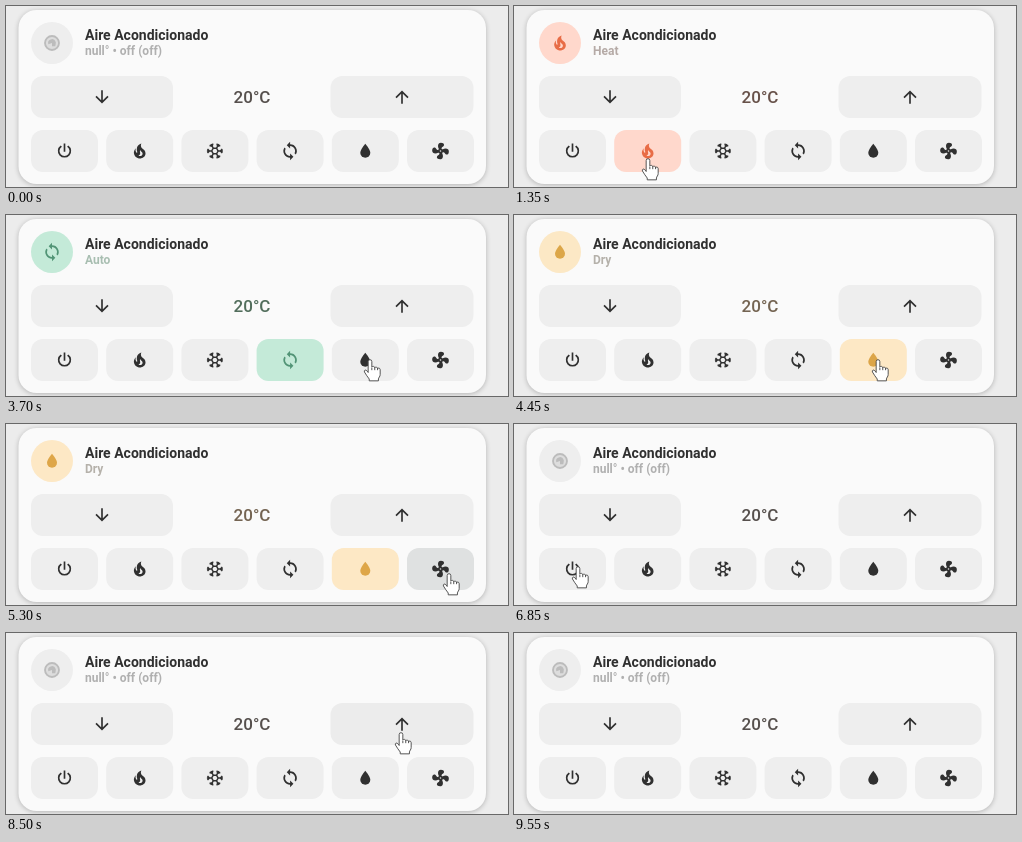
Recreate the animation shown at these times as an HTML page with a canvas. Size 502x181 px, loop 9.65 s.

```html
<!DOCTYPE html>
<html lang="es">
<head>
<meta charset="utf-8">
<title>Aire Acondicionado</title>
<style>
  html, body { margin: 0; width: 100%; height: 100%; overflow: hidden; background: #ececec; }
  canvas { display: block; width: 502px; height: 181px; filter: blur(.4px); }
</style>
</head>
<body>
<canvas id="stage"></canvas>
<script>
const LOOP = 9650, W = 502, H = 181, FADE = 280;
const canvas = document.getElementById('stage');
const ctx = canvas.getContext('2d');
const ratio = window.devicePixelRatio || 1;
canvas.width = W * ratio;
canvas.height = H * ratio;

const GREY = [238, 238, 238], PRESSED = [223, 225, 225], INK = [48, 48, 48];

const MODES = {
  off:  { label: 'null° • off (off)', bg: GREY, fg: [188, 188, 188], text: [86, 80, 77], sub: '#b0b0b0' },
  heat: { label: 'Heat', bg: [255, 216, 204], fg: [232, 108, 70], text: [104, 82, 74], sub: '#b5aaa6' },
  cool: { label: 'Cool', bg: [209, 218, 248], fg: [70, 98, 208], text: [66, 70, 100], sub: '#b2b2b6' },
  auto: { label: 'Auto', bg: [196, 234, 216], fg: [82, 148, 118], text: [82, 110, 92], sub: '#a8beb1' },
  dry:  { label: 'Dry', bg: [253, 232, 197], fg: [222, 166, 72], text: [116, 100, 82], sub: '#b5b1aa' },
  fan:  { label: 'Fan only', bg: [200, 235, 240], fg: [62, 160, 180], text: [72, 100, 108], sub: '#a8b6b8' }
};
const ORDER = Object.keys(MODES);

// [time, mode]
const CHANGES = [[0, 'off'], [1020, 'heat'], [2150, 'cool'], [3020, 'auto'], [4200, 'dry'], [5380, 'fan'], [6320, 'off']];
// [time, button]
const CLICKS = [[950, 'heat'], [2070, 'cool'], [2950, 'auto'], [4120, 'dry'], [5270, 'fan'], [6280, 'off'], [7200, 'down'], [8250, 'up']];
// [time, x, y] of the pointer tip
const PATH = [
  [350, 97, 175], [450, 109, 167], [650, 122, 159], [950, 134, 153], [1600, 134, 153],
  [1950, 218, 147], [2600, 218, 147], [2900, 288, 149], [3500, 288, 149], [3700, 364, 145],
  [4450, 364, 145], [4650, 438, 149], [4950, 443, 154], [5250, 443, 150], [5930, 443, 150],
  [6280, 65, 144], [6700, 64, 143], [6850, 64, 143], [7150, 119, 99], [7680, 119, 99],
  [8150, 395, 100], [8850, 395, 100], [9450, 408, 184]
];

const SHAPES = {
  down: 'M11 4H13V16L18.5 10.5L19.9 11.9L12 19.8L4.1 11.9L5.5 10.5L11 16Z',
  up: 'M13 20H11V8L5.5 13.5L4.1 12.1L12 4.2L19.9 12.1L18.5 13.5L13 8Z',
  off: 'M16.6 5.4L15.1 6.9A6 6 0 1 1 8.9 6.9L7.4 5.4A8 8 0 1 0 16.6 5.4M13 3H11V13H13Z',
  heat: 'M17.7 11.2C16.9 10.2 15.7 9.6 14.8 8.7C13.3 7.3 13 4.9 14 3C9.7 4 7.3 8.6 9.1 13.2C9.4 14 8.5 14.4 8 13.8C6.9 12.3 6.7 10.3 7.5 8.6C5.8 10 4.9 12.3 5 14.5C5.3 18 8 20.6 11 20.9C15 21.4 19 19 19 15C19 13.5 18.5 12.2 17.7 11.2M14.5 17.5C13.2 18.5 11.5 18.2 10.5 17.3C12.2 16.9 12.9 15.5 12.5 14C12.2 12.8 12.1 12 12.5 10.9C13.4 12.8 15 13 15.4 14.8C15.6 15.8 15.2 16.9 14.5 17.5Z',
  auto: 'M12 18A6 6 0 0 1 6.7 9.2L5.2 7.7A8 8 0 0 0 12 20V23L16 19L12 15ZM12 4V1L8 5L12 9V6A6 6 0 0 1 17.3 14.8L18.8 16.3A8 8 0 0 0 12 4Z',
  dry: 'M12 20A6 6 0 0 1 6 14C6 10 12 3.2 12 3.2C12 3.2 18 10 18 14A6 6 0 0 1 12 20Z',
  blade: 'M12.5 2C17 2 17.1 5.6 14.8 6.8C13.8 7.2 13.3 8.3 13.1 9.2L12 11L10.1 9.7C8.2 6 8.9 2 12.5 2Z',
  hand: 'M-1.9 1.6A1.9 1.9 0 0 1 1.9 1.6V7.4A1.6 1.6 0 0 1 4.9 8.1A1.6 1.6 0 0 1 7.8 9A1.5 1.5 0 0 1 10.5 10V15C10.5 17 8.9 18.2 8.7 19.5V21.5H-.8V19.6C-2.5 17.5-4 15.2-5.7 12.4C-6.6 10.6-4.4 9.6-3.3 11L-1.9 12.9Z',
  arrow: 'M0 0V16L3.7 12.5L6.1 18L8.6 16.9L6.2 11.5H11.3Z'
};
for (const name in SHAPES) SHAPES[name] = new Path2D(SHAPES[name]);

const BUTTONS = [
  { id: 'down', x: 25, y: 70, w: 142 },
  { id: 'up', x: 324.5, y: 70, w: 143 },
  ...ORDER.map((id, i) => ({ id, x: 25 + i * 75.2, y: 124, w: 67 }))
];
const BTN_H = 42;

const clamp = v => Math.max(0, Math.min(1, v));
const ease = v => v * v * (3 - 2 * v);
const mix = (a, b, k) => a.map((v, i) => v + (b[i] - v) * k);
const rgb = c => `rgb(${c.map(Math.round).join(',')})`;

function fillBox(x, y, w, h, r, color) {
  ctx.fillStyle = color;
  ctx.beginPath();
  ctx.roundRect(x, y, w, h, r);
  ctx.fill();
}

function label(str, x, y, font, color, align = 'left') {
  ctx.font = `${font} Roboto, sans-serif`;
  ctx.textAlign = align;
  ctx.fillStyle = color;
  ctx.fillText(str, x, y);
}

function snowflake() {
  ctx.lineWidth = 1.8;
  ctx.translate(12, 12);
  ctx.rotate(Math.PI / 6);
  ctx.beginPath();
  for (let i = 0; i < 6; i++) {
    ctx.moveTo(0, -3.9);
    ctx.lineTo(3.38, -1.95);
    ctx.moveTo(0, -3.6);
    ctx.lineTo(0, -9.6);
    ctx.moveTo(-2.3, -8.9);
    ctx.lineTo(0, -6.6);
    ctx.lineTo(2.3, -8.9);
    ctx.rotate(Math.PI / 3);
  }
  ctx.stroke();
}

function fan() {
  ctx.translate(12, 12);
  for (let i = 0; i < 4; i++) {
    ctx.save();
    ctx.rotate(i * Math.PI / 2);
    ctx.translate(-12, -12);
    ctx.fill(SHAPES.blade);
    ctx.restore();
  }
  ctx.lineWidth = 2;
  ctx.beginPath();
  ctx.arc(0, 0, 2, 0, 7);
  ctx.stroke();
}

function idle() {
  ctx.lineWidth = 2.2;
  ctx.beginPath();
  ctx.arc(12, 12, 8.4, 0, 7);
  ctx.stroke();
  ctx.globalAlpha = 0.35;
  ctx.fill();
  ctx.globalAlpha = 1;
  ctx.beginPath();
  ctx.arc(12, 12, 4.6, 2.8, 6.2);
  ctx.lineTo(16, 16);
  ctx.lineTo(12, 16);
  ctx.lineTo(12, 12);
  ctx.closePath();
  ctx.fill();
}

const SPECIAL = { cool: snowflake, fan, idle };

function icon(id, x, y, size, color) {
  ctx.save();
  ctx.translate(x, y);
  ctx.scale(size / 24, size / 24);
  ctx.translate(-12, -12);
  ctx.fillStyle = ctx.strokeStyle = color;
  if (SPECIAL[id]) SPECIAL[id]();
  else ctx.fill(SHAPES[id], 'evenodd');
  ctx.restore();
}

function modeAt(t) {
  let i = CHANGES.length - 1;
  while (CHANGES[i][0] > t) i--;
  const id = CHANGES[i][1];
  const from = i ? CHANGES[i - 1][1] : id;
  const v = clamp((t - CHANGES[i][0]) / FADE);
  return { id, from, k: 1 - (1 - v) ** 2 };
}

function pressAt(t, id) {
  return CLICKS.reduce((best, [start, target]) => {
    if (target !== id || t < start) return best;
    return Math.max(best, Math.min(1, (t - start + 30) / 40) * clamp(1 - (t - start - 80) / 200));
  }, 0);
}

function pointerAt(t) {
  const i = PATH.findIndex(p => p[0] > t);
  if (i < 1) return null;
  const [a, b] = [PATH[i - 1], PATH[i]];
  return mix(a, b, ease((t - a[0]) / (b[0] - a[0]))).slice(1);
}

function drawPointer(t) {
  const tip = pointerAt(t);
  if (!tip) return;
  const [x, y] = tip.map(Math.round);
  const over = BUTTONS.some(b => x >= b.x && x <= b.x + b.w && y >= b.y && y <= b.y + BTN_H);
  const shape = over ? SHAPES.hand : SHAPES.arrow;
  ctx.save();
  ctx.translate(x, y);
  ctx.scale(0.97, 0.97);
  ctx.fillStyle = '#fff';
  ctx.strokeStyle = '#505050';
  ctx.lineWidth = 1;
  ctx.lineJoin = 'round';
  ctx.fill(shape);
  ctx.stroke(shape);
  if (over) {
    ctx.beginPath();
    for (const gap of [1.9, 4.9, 7.8]) {
      ctx.moveTo(gap, 8);
      ctx.lineTo(gap, 10.5);
    }
    ctx.stroke();
  }
  ctx.restore();
}

function drawCard() {
  ctx.fillStyle = '#ececec';
  ctx.fillRect(0, 0, W, H);
  ctx.save();
  ctx.shadowColor = 'rgba(0,0,0,.24)';
  ctx.shadowBlur = 5 * ratio;
  ctx.shadowOffsetY = ratio;
  fillBox(12.5, 4, 467.5, 174, 18, '#fafafa');
  ctx.restore();
}

function draw(t) {
  const { id, from, k } = modeAt(t);
  const now = MODES[id], old = MODES[from];
  ctx.setTransform(ratio, 0, 0, ratio, 0, 0);
  drawCard();

  fillBox(25, 16, 42, 42, 21, rgb(mix(old.bg, now.bg, k)));
  icon(id === 'off' ? 'idle' : id, 46, 37, 20, rgb(mix(old.fg, now.fg, k)));
  label('Aire Acondicionado', 79, 34, '700 14px', '#303030');
  label(now.label, 79, 49, '700 12px', now.sub);

  for (const b of BUTTONS) {
    let bg = GREY, fg = INK;
    const on = b.id === id ? k : b.id === from ? 1 - k : 0;
    if (on && b.id !== 'off') {
      bg = mix(GREY, MODES[b.id].bg, on);
      fg = mix(INK, MODES[b.id].fg, on);
    }
    bg = mix(bg, PRESSED, pressAt(t, b.id) * (1 - on));
    fillBox(b.x, b.y, b.w, BTN_H, 12, rgb(bg));
    icon(b.id, b.x + b.w / 2, b.y + BTN_H / 2, 20, rgb(fg));
  }

  const temp = t >= 7300 && t < 8430 ? '19.5' : '20';
  label(temp + '°C', 246, 97, '500 17px', rgb(mix(old.text, now.text, k)), 'center');
  drawPointer(t);
}

function tick() {
  draw(performance.now() % LOOP);
  requestAnimationFrame(tick);
}
tick();
</script>
</body>
</html>
```
